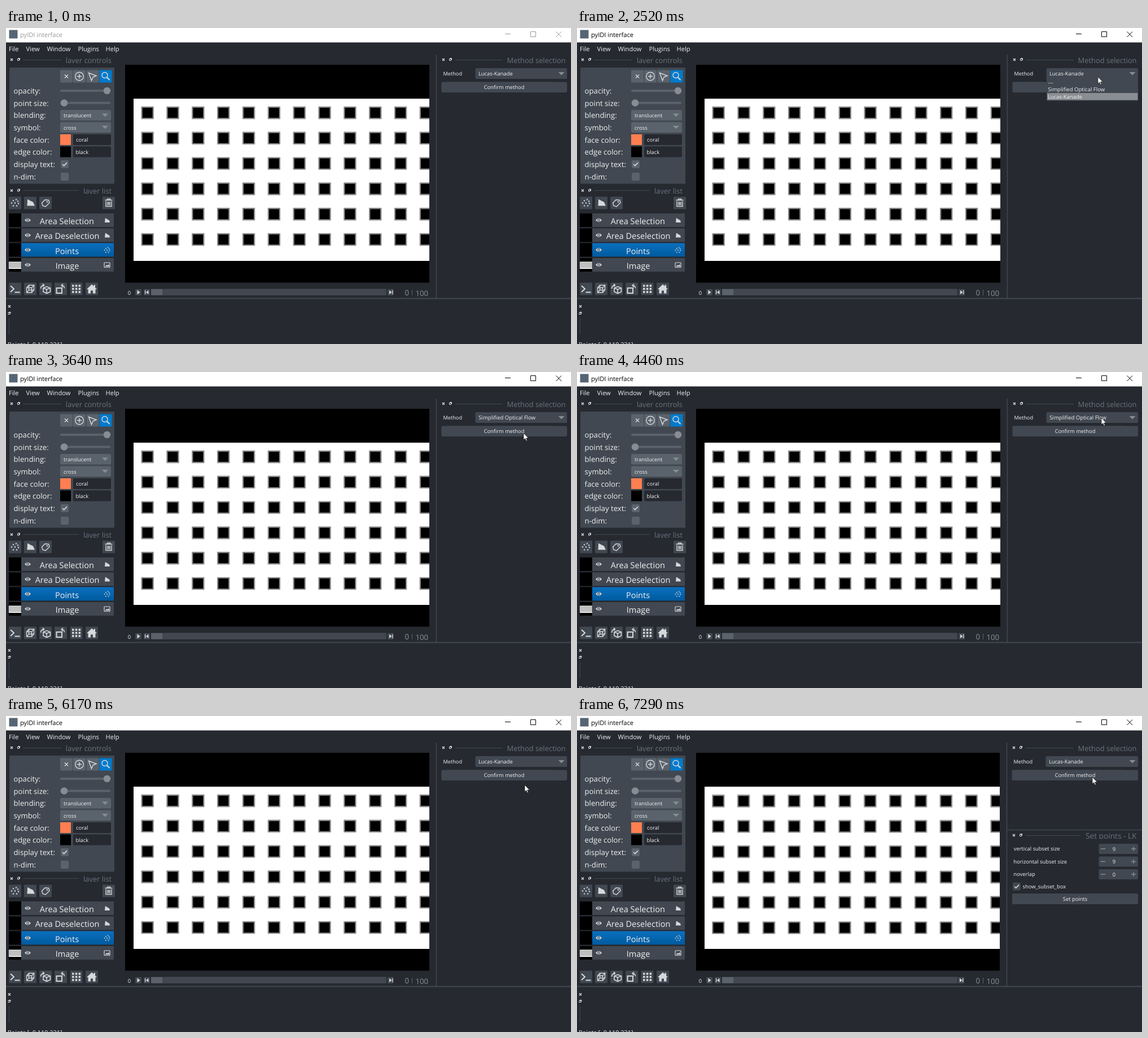
An HTML page for the animation above (7790 ms loop, 1001 by 559 pixels).

```html
<!DOCTYPE html>
<html lang="en">
<head>
<meta charset="utf-8">
<title>pyIDI interface</title>
<style>
html, body { margin: 0; width: 100%; height: 100%; overflow: hidden; background: #262930; }
svg { display: block; width: 1001px; height: 559px; font-family: "Open Sans", "Noto Sans", sans-serif; text-rendering: geometricPrecision; }
text { fill: #f0f1f2; white-space: pre; }
.menu { font-size: 11.1px; }
.label { font-size: 13.2px; }
.small { font-size: 9.4px; }
.layer { font-size: 14.5px; text-anchor: middle; }
.dock { font-size: 12.9px; text-anchor: end; fill: #6a7380; }
.mid { text-anchor: middle; }
.fg { fill: #414851; }
.pri { fill: #5a626c; }
.sec { fill: #868e93; }
.ink { fill: #d6d9dc; }
.line { fill: none; stroke: #d6d9dc; stroke-width: 1.4; }
.rule { fill: none; stroke: #414851; }

.bar, .lk, .flow, .popup, .mark, .panel, .edge, .dots, .cursor { animation: 7790ms step-end infinite; }
.bar { animation-name: bar; }
.lk { animation-name: lk; }
.flow { animation-name: flow; }
.popup { animation-name: popup; }
.mark { animation-name: mark; }
.panel { animation-name: panel; }
.edge { animation-name: edge; }
.dots { animation-name: dots; }
.cursor { animation-name: cursor; }

@keyframes bar { 0% { color: #999 } 23.492%, 100% { color: #000 } }
@keyframes lk { 0% { opacity: 1 } 45.443% { opacity: 0 } 77.92%, 100% { opacity: 1 } }
@keyframes flow { 0% { opacity: 0 } 45.443% { opacity: 1 } 77.92%, 100% { opacity: 0 } }
@keyframes popup {
  0% { opacity: 0 } 24.775% { opacity: 1 } 45.443% { opacity: 0 }
  61.104% { opacity: 1 } 77.92%, 100% { opacity: 0 }
}
@keyframes mark {
  0% { transform: translateY(25px) } 33.684% { transform: none } 37.689% { transform: translateY(12.5px) }
  66.11% { transform: none } 67.394% { transform: translateY(12.5px) } 72.529%, 100% { transform: translateY(25px) }
}
@keyframes panel { 0% { opacity: 0 } 90.886%, 100% { opacity: 1 } }
@keyframes edge { 0% { transform: none } 90.886%, 100% { transform: translateX(-1px) } }
@keyframes dots { 0% { transform: none } 90.886%, 100% { transform: translate(-.4px, .4px) } }
@keyframes cursor {
  0% { opacity: 0; transform: translate(855.7px, 606px); animation-timing-function: step-end }
  10.398% { opacity: 1; transform: translate(855.7px, 606px); animation-timing-function: steps(4, start) }
  15.533% { opacity: 1; transform: translate(893px, 270px); animation-timing-function: steps(4, start) }
  20.667% { opacity: 1; transform: translate(924px, 82px); animation-timing-function: step-end }
  32.349% { opacity: 1; transform: translate(924px, 82px); animation-timing-function: steps(6, start) }
  40.359% { opacity: 1; transform: translate(917px, 108px); animation-timing-function: step-end }
  50.578% { opacity: 1; transform: translate(917px, 108px); animation-timing-function: steps(6, start) }
  58.588% { opacity: 1; transform: translate(929px, 81px); animation-timing-function: step-end }
  64.827% { opacity: 1; transform: translate(929px, 81px); animation-timing-function: steps(3, start) }
  68.678% { opacity: 1; transform: translate(926px, 103px); animation-timing-function: steps(5, start) }
  75.096% { opacity: 1; transform: translate(919px, 122px); animation-timing-function: step-end }
  83.055% { opacity: 1; transform: translate(919px, 122px); animation-timing-function: steps(2, start) }
  85.623%, 100% { opacity: 1; transform: translate(913px, 108px); animation-timing-function: step-end }
}
</style>
</head>
<body>
<svg viewBox="0 0 1001 559">
  <defs>
    <linearGradient id="blue" x2="0" y2="1"><stop stop-color="#0b70bf"/><stop offset="1" stop-color="#005a9e"/></linearGradient>
    <g id="grip">
      <path class="line" stroke-width="1.2" d="M-2-2 2 2M2-2-2 2"/>
      <path class="line" style="stroke-width:1" d="M10.5-1.5h3v3h-3zM11.5-2.5h3v3"/>
    </g>
    <rect id="btn" width="22" height="22" rx="1"/>
    <path id="arrow" class="sec" d="M-5.500-2.500h11L0 3z"/>
    <path id="tick" class="line" style="stroke-width:1.7" d="M-4 0-1.300 2.800 4-2.800"/>
    <g id="eye"><path class="ink" d="M-5.500 0Q0-6.500 5.500 0 0 6.500-5.500 0z"/><circle r="2.400" fill="#414851"/><circle r="1.200" class="ink"/></g>
    <path id="shape" class="ink" d="M-4-5 4 0 5 4H-5z"/>
    <g id="scatter" class="ink">
      <circle r="1.300"/><circle cx="-6" cy="0" r="1.200"/><circle cx="6" cy="1" r="1.200"/><circle cx="-3" cy="-4" r="1.200"/>
      <circle cx="2" cy="-6" r="1.200"/><circle cx="5" cy="-3" r="1.200"/><circle cx="-3" cy="5" r="1.200"/><circle cx="3" cy="5" r="1.200"/>
    </g>
    <g id="spin">
      <rect class="fg" x="924.5" y="-9" width="69.5" height="18" rx="2"/>
      <path d="M928 0h8M982 0h8M986-4v8" fill="none" stroke="#868e93" stroke-width="1.300"/>
    </g>
    <clipPath id="cut"><path d="M0 0H1001V62.500H0zM0 270H400V293.800H0zM700 200H1001V217H700z"/></clipPath>
    <clipPath id="view"><rect x="226" y="125" width="524" height="287"/></clipPath>
  </defs>

  <!-- window frame -->
  <rect width="1001" height="559" fill="#262930"/>
  <rect width="1001" height="25.500" fill="#fff"/>
  <rect x="5.500" y="3.500" width="15" height="15" fill="#566574"/>
  <g class="bar">
    <text class="menu" x="25" y="15.500" style="fill:currentColor">pyIDI interface</text>
    <path fill="none" stroke="currentColor" d="M884 10.500h10M929.500 6.500h9v9h-9zM974.500 6.500l9.500 9.500M984 6.500l-9.500 9.500"/>
  </g>
  <g class="menu">
    <text x="5" y="41">File</text><text x="35.500" y="41">View</text><text x="72.500" y="41">Window</text>
    <text x="127.500" y="41">Plugins</text><text x="176.500" y="41">Help</text>
  </g>

  <!-- layer controls -->
  <use href="#grip" x="10" y="56"/><path class="rule" d="M30 56.500h68"/>
  <use href="#grip" x="10" y="287.500"/><path class="rule" d="M30 287.500h99"/>
  <g clip-path="url(#cut)">
    <text class="dock" x="187" y="61.500">layer controls</text>
    <text class="dock" x="187" y="293">layer list</text>
  </g>
  <rect class="fg" x="6" y="70" width="186" height="205.500" rx="1"/>
  <g class="pri">
    <use href="#btn" x="96" y="74.500"/><use href="#btn" x="119" y="74.500"/><use href="#btn" x="142.500" y="74.500"/>
    <use href="#btn" x="165.500" y="74.500" fill="#007acc"/>
  </g>
  <path class="line" d="M104 82.500l6 6M110 82.500l-6 6M126 85.500h8M130 81.500v8M146.500 79.500l13.500 5-6 2.500-2.500 6z"/>
  <circle class="line" cx="130" cy="85.500" r="7.300"/>
  <circle class="line" cx="175" cy="83.500" r="5"/><path class="line" style="stroke-width:2" d="M178.500 87l5 5"/>
  <g class="label" id="labels"></g>
  <rect class="pri" x="96" y="109" width="89" height="4" rx="2"/><circle class="sec" cx="179" cy="111" r="6.200"/>
  <rect class="pri" x="96" y="130.500" width="89" height="4" rx="2"/><circle class="sec" cx="103" cy="132.500" r="6.200"/>
  <rect class="pri" x="96" y="145" width="90" height="18.500" rx="2"/><use href="#arrow" x="175.500" y="154"/>
  <rect class="pri" x="96" y="166.500" width="90" height="18.500" rx="2"/><use href="#arrow" x="175.500" y="175.500"/>
  <rect x="96" y="188" width="19" height="19" fill="#ff7f50"/><rect x="119" y="188" width="67" height="19" rx="2" fill="#262930"/>
  <rect x="96" y="209.500" width="19" height="19"/><rect x="119" y="209.500" width="67" height="19" rx="2" fill="#262930"/>
  <g class="small">
    <text x="102" y="158">translucent</text><text x="102" y="179.500">cross</text>
    <text x="124" y="201">coral</text><text x="123.500" y="222.500">black</text>
  </g>
  <rect class="pri" x="97" y="234" width="14" height="14" rx="2"/><use href="#tick" x="104" y="241"/>
  <rect class="pri" x="97" y="256" width="14" height="14" rx="2"/>

  <!-- layer list -->
  <g class="fg">
    <use href="#btn" x="5" y="298.500"/><use href="#btn" x="32" y="298.500"/><use href="#btn" x="59" y="298.500"/><use href="#btn" x="171" y="298.500"/>
    <path d="M27 328h164v24H27zM27 354.500h164v24H27zM27 407h164v24H27z"/>
  </g>
  <rect x="27" y="380.500" width="164" height="24" fill="url(#blue)"/>
  <use href="#scatter" x="16" y="309.500"/>
  <path class="ink" d="M38 303l10 5 3 6.500H37.500z"/>
  <path class="line" d="M63.500 309.500l5.500-5.500 6.500.5 1.500 4.500-7 7-5-1.500z"/><circle class="ink" cx="73" cy="307.500" r="1.300"/>
  <path class="line" d="M175.500 304.500h13M179.500 304v-1.500h5v1.500M177 306.500v9h10v-9M180 307.500v6M182 307.500v6M184.300 307.500v6"/>
  <path d="M5 328h22v24H5zM5 354.500h22v24H5zM5 380.500h22v24H5zM5 407h22v24H5z"/>
  <rect x="5" y="413.500" width="22" height="12.500" fill="#fff"/>
  <path d="M6 415.500h21M6 417.500h21M6 419.500h21M6 421.500h21M6 423.500h21" stroke="#000" stroke-dasharray="1 1"/>
  <use href="#eye" x="38.500" y="340"/><use href="#eye" x="38.500" y="366.500"/><use href="#eye" x="38.500" y="392.500"/><use href="#eye" x="38.500" y="419"/>
  <use href="#shape" transform="translate(179.500 340.500) scale(.9)"/><use href="#shape" transform="translate(179.500 367) scale(.9)"/>
  <use href="#scatter" transform="translate(179 393) scale(.75)"/>
  <rect class="line" style="stroke-width:1.200" x="174" y="415" width="10" height="8.500" rx="1"/><path class="ink" d="M175.500 422l2.500-3 1.500 1.500 2-2.500 2 4z"/>
  <g class="layer">
    <text x="107.800" y="346.500">Area Selection</text><text x="108.500" y="373">Area Deselection</text>
    <text x="108" y="399.500">Points</text><text x="108.500" y="426">Image</text>
  </g>

  <!-- viewer buttons -->
  <g class="fg">
    <use href="#btn" x="5" y="450.500"/><use href="#btn" x="32" y="450.500"/><use href="#btn" x="59" y="450.500"/>
    <use href="#btn" x="86" y="450.500"/><use href="#btn" x="113.500" y="450.500"/><use href="#btn" x="141" y="450.500"/>
  </g>
  <path class="line" style="stroke-width:2" d="M8 456l6 5.500-6 5.500M15.500 467.500h9"/>
  <path class="line" d="M36.500 459.500h9v8.500h-9zM36.500 459.500l4-4.500h9l-4 4.500M49.500 455v8.500l-4 4.500M40.500 455v8.500h9M40.500 463.500l-4 4.500"/>
  <path class="line" style="stroke-width:1.600" d="M66 460l6-2.500 6.500 2.500v6.500l-6.500 3-6-3zM66 460l6 2.500 6.500-2.500M72 462.500v7M62 461q-1-5 5-6M65 452.500l2.500 2.500-2.500 2.500"/>
  <path class="line" style="stroke-width:2" d="M89.500 460h9.500v9h-9.500z"/><path class="line" d="M99 455.500q4.500 0 4.500 5M101 452.500l-3 3 3 3"/>
  <path d="M117 456h16M117 461.500h16M117 467h16" stroke="#d6d9dc" stroke-width="3.500" stroke-dasharray="3.500 2.300"/>
  <path class="ink" d="M143 462l9-8.500 3.500 3.300v-2.300h2.500v4.700l3 2.800h-2.500v7.500h-4.500v-5h-4v5h-4.500V462z"/>

  <!-- canvas -->
  <rect x="211" y="65" width="539" height="385.500"/>
  <g clip-path="url(#view)">
    <rect x="226" y="125" width="524" height="287" fill="#fff"/>
    <g class="dots" id="dots"></g>
  </g>
  <text class="small" x="215.800" y="471.500">0</text>
  <rect class="fg" x="229" y="462" width="11" height="11"/><path class="ink" d="M232.500 463.500l5 4-5 4z"/>
  <rect class="fg" x="244" y="462" width="11" height="11"/><path class="ink" d="M246 464h1.300v7H246zM252.500 464v7l-4.500-3.500z"/>
  <rect class="fg" x="257" y="461.500" width="417" height="11.500"/><rect class="pri" x="257" y="462" width="20" height="10.500" fill="#6a7380"/>
  <text class="label" x="706.500" y="472.500" style="fill:#8a919a">0</text><path class="rule" style="stroke:#5a626c" d="M719.500 463v10"/>
  <text class="label" x="725.500" y="473.500" style="fill:#8a919a">100</text>

  <!-- bottom dock -->
  <path class="rule" stroke-width="2" d="M0 478.500h1001"/>
  <use href="#grip" x="6" y="492.500"/><rect x="15" y="488" width="8" height="8" fill="#262930"/>
  <path class="line" style="stroke-width:1" d="M4 503.500h3v3H4zM5 502.500h3v3"/>
  <path class="rule" d="M5.500 513v29"/>
  <text class="menu" x="3" y="563.800" style="font-size:10.900px">Points [&#160; 0 119 231]</text>

  <!-- method dock -->
  <rect class="fg" x="840" y="71" width="154" height="19" rx="2"/><rect class="fg" x="780" y="95.500" width="214" height="18.500" rx="2"/>
  <g class="edge">
    <rect x="750" y="60" width="11" height="392" fill="#262930"/>
    <path class="rule" stroke-width="1.500" d="M762.500 47v431"/>
    <rect class="fg" x="676" y="462" width="11" height="11"/><path class="ink" d="M679 464v7l4.500-3.500zM684 464h1.300v7H684z"/>
    <use href="#grip" x="775" y="56"/><path class="rule" d="M796 56.500h84"/>
    <text class="small" x="774.500" y="84.300" style="font-size:9.200px">Method</text>
    <rect class="fg" x="831.500" y="71" width="100" height="19" rx="2"/><rect class="fg" x="771.500" y="95.500" width="200" height="18.500" rx="2"/>
    <text class="small lk" x="837" y="84.300">Lucas-Kanade</text><text class="small flow" x="837.300" y="84.300" style="font-size:9.550px">Simplified Optical Flow</text>
  </g>
  <text class="dock" x="991.500" y="61.500">Method selection</text>
  <use href="#arrow" x="984" y="80.500"/>
  <text class="small mid" x="882.500" y="108.300" style="font-size:9.300px">Confirm method</text>

  <g class="popup">
    <rect class="fg" x="832" y="88" width="162" height="40"/>
    <rect class="mark" x="833" y="90" width="160.500" height="12.500" fill="#8a8d91"/>
    <path d="M832.500 128h161.500" stroke="#5a626c" stroke-width=".6"/>
    <g class="small">
      <text x="834.500" y="99.500">---</text><text x="834.500" y="112.200" style="font-size:9.550px">Simplified Optical Flow</text><text x="834" y="124.700">Lucas-Kanade</text>
    </g>
  </g>

  <g class="panel">
    <path class="rule" stroke-width="1.500" d="M762 201.500h239"/>
    <use href="#grip" x="774" y="211"/><path class="rule" d="M795 211.500h97"/>
    <g clip-path="url(#cut)"><text class="dock" x="991.500" y="216.500" style="font-size:13.700px">Set points - LK</text></g>
    <use href="#spin" y="235"/><use href="#spin" y="257.500"/><use href="#spin" y="280"/>
    <rect class="fg" x="772" y="294.500" width="14" height="14" rx="2"/><use href="#tick" x="779" y="301.500"/>
    <rect class="fg" x="771" y="314" width="223" height="19" rx="2"/>
    <g class="small">
      <text x="773.700" y="238.300">vertical subset size</text><text x="773.300" y="260.800">horizontal subset size</text>
      <text x="773.300" y="283.300">noverlap</text><text x="789.500" y="305">show_subset_box</text>
      <text class="mid" x="951.500" y="238.500">9</text><text class="mid" x="951.500" y="261">9</text><text class="mid" x="951.500" y="283.500">0</text>
      <text class="mid" x="882.500" y="327.300">Set points</text>
    </g>
  </g>

  <path class="cursor" d="M0 0V12.200L2.700 9.600 4.700 14 6.500 13.200 4.600 9H8.600z" fill="#fff" stroke="#111" stroke-width=".7"/>
</svg>
<script>
const add = (id, tag, attrs, text = "") => {
  const el = document.createElementNS("http://www.w3.org/2000/svg", tag);
  for (const k in attrs) el.setAttribute(k, attrs[k]);
  el.textContent = text;
  document.getElementById(id).append(el);
};

["opacity", "point size", "blending", "symbol", "face color", "edge color", "display text", "n-dim"]
  .forEach((name, i) => add("labels", "text", { x: 13.5, y: 116 + 21.65 * i }, name + ":"));

// image pixels are 2.242 px wide; squares are 10 pixels, repeated every 20
const px = 2.242;
for (let row = 0; row < 6; row++) {
  for (let col = 0; col < 12; col++) {
    const x = 226 + px * (6 + 20 * col), y = 125.3 + px * (6 + 20 * row);
    add("dots", "rect", { x, y, width: 10 * px, height: 10 * px, rx: 1, fill: "#8c8c8c" });
    add("dots", "rect", { x: x + px, y: y + px, width: 8 * px, height: 8 * px });
  }
}
</script>
</body>
</html>
```
